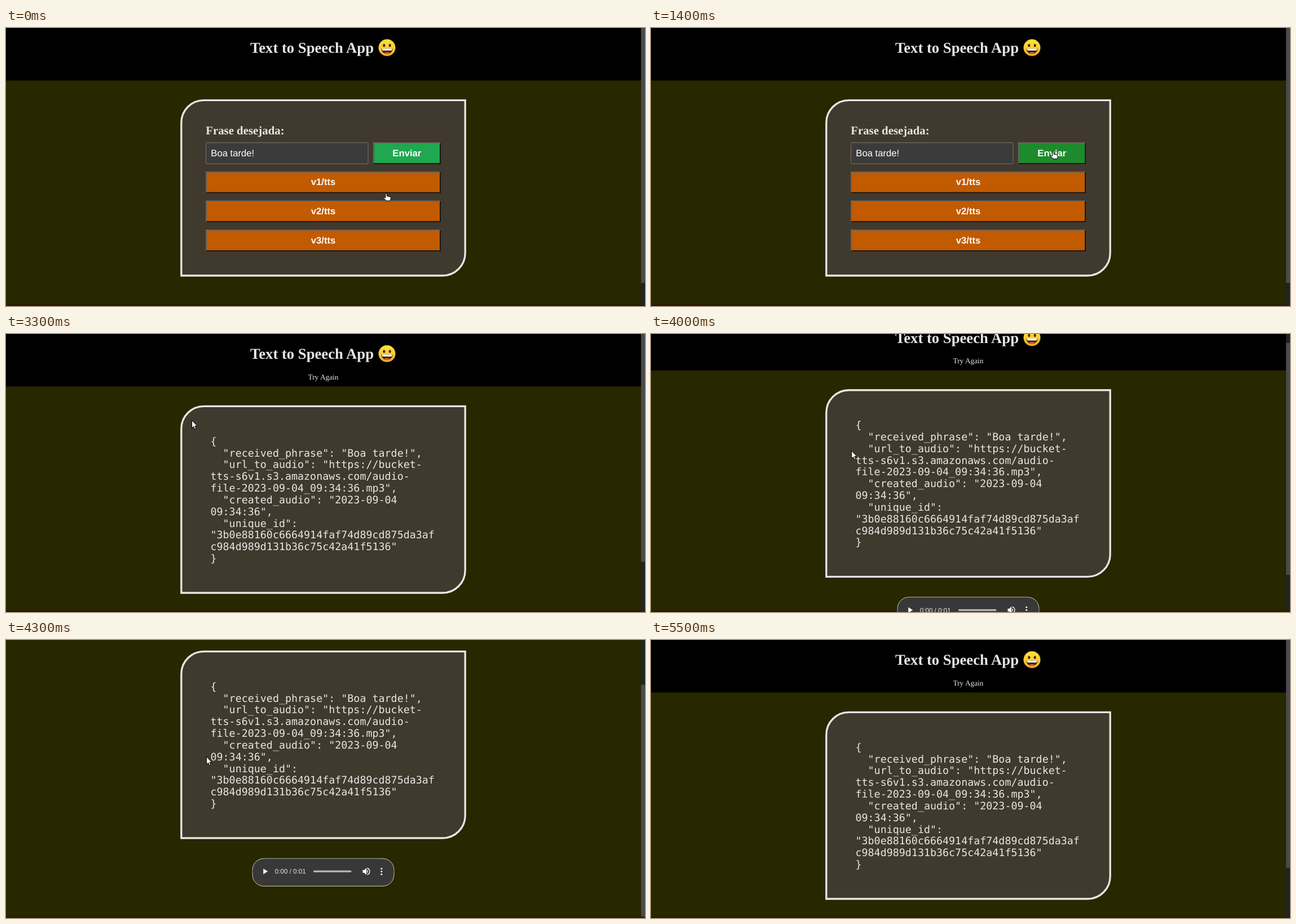
Write an HTML page that moves like this. It is 1133 by 494 pixels and loops after 5900 ms.

```html
<!DOCTYPE html>
<html lang="pt">
<head>
<meta charset="utf-8">
<title>Text to Speech App</title>
<style>
  html, body { margin: 0; width: 100%; height: 100%; overflow: hidden; background: #272700; }
  #stage { position: relative; width: 1133px; height: 494px; overflow: hidden; background: #272700; }
  #stage div, #stage > svg, #page svg { position: absolute; }
  svg { left: 0; top: 0; overflow: visible; }

  /* The page is laid out 1350px wide and shown at five sixths. */
  #page { left: 0; top: 0; width: 1350px; transform-origin: 0 0; text-rendering: geometricPrecision; }
  #header { left: 0; top: 0; width: 1351px; height: 112px; background: #000; }
  .card {
    left: 371px; top: 152px; width: 608px; height: 378px; box-sizing: border-box;
    border: 4px solid #e8e6e3; border-radius: 50px 0; background: #40392e;
  }
  #answer .card { height: 402px; }
  text { fill: #e8e6e3; }
  .serif { font-family: "Liberation Serif", "Times New Roman", serif; }
  .bold { font-weight: bold; }
  .sans, .button { font-family: "Liberation Sans", Arial, sans-serif; }
  .mono { font: 22px "DejaVu Sans Mono", monospace; white-space: pre; }

  #strip { left: 0; top: 491px; width: 1126px; height: 3px; background: #281b09; }
  #track { left: 1126px; top: 0; width: 7px; height: 494px; background: #202324; }
  #thumb { left: 1126px; top: -7px; width: 7px; background: #484b4d; }

  .button {
    --base: #c25a00; --hover: #cc3000; --h: 0;
    left: 425px; width: 500px; height: 46px; box-sizing: border-box;
    display: flex; align-items: center; justify-content: center;
    border: 2px solid; border-color: #6c6a66 #141311 #141311 #6c6a66;
    background: var(--base); background-clip: padding-box; isolation: isolate;
    color: #fff; font-size: 20px; font-weight: bold;
  }
  .button::before {
    content: ""; position: absolute; inset: 0; z-index: -1;
    background: var(--hover); opacity: var(--h);
  }
  .button.pressed { border-color: #141311 #6c6a66 #6c6a66 #141311; }
  #send { --base: #20a74f; --hover: #1e8a2e; left: 781px; top: 244px; width: 144px; }
  #v1 { top: 306px; }
  #v2 { top: 368px; }
  #v3 { top: 430px; }
</style>
</head>
<body>
<div id="stage">
  <div id="strip"></div>
  <div id="page">
    <div id="header"></div>
    <svg width="1350" height="112">
      <defs>
        <linearGradient id="skin" x2="0" y2="1">
          <stop stop-color="#ffe23a"/><stop offset=".55" stop-color="#fdcb2e"/><stop offset="1" stop-color="#f7a021"/>
        </linearGradient>
      </defs>
      <text class="serif bold" x="519.5" y="53" font-size="32">Text to Speech App</text>
      <g transform="translate(810.6 42) scale(1.2)">
        <circle r="15" fill="url(#skin)"/>
        <g fill="#422b0d">
          <ellipse cx="-5.2" cy="-4" rx="2" ry="2.8"/>
          <ellipse cx="5.2" cy="-4" rx="2" ry="2.8"/>
          <path d="M-10 1.5H10C10 7 5.5 11 0 11S-10 7-10 1.5Z"/>
        </g>
        <path d="M-9.3 1.5H9.3Q9 4.5 7.5 5H-7.5Q-9 4.5-9.3 1.5Z" fill="#fff"/>
        <path d="M-5 9.3Q0 6.5 5 9.3Q0 12-5 9.3Z" fill="#e0604f"/>
      </g>
    </svg>

    <div id="ask">
      <div class="card"></div>
      <svg width="1350" height="593">
        <text class="serif bold" x="425" y="227" font-size="25">Frase desejada:</text>
        <rect x="425.5" y="244.5" width="345" height="45" rx="2" fill="#3b3b3b" stroke="#85827d"/>
        <text class="sans" x="436" y="273.5" font-size="20" style="fill:#fff">Boa tarde!</text>
      </svg>
      <div class="button" id="send">Enviar</div>
      <div class="button" id="v1">v1/tts</div>
      <div class="button" id="v2">v2/tts</div>
      <div class="button" id="v3">v3/tts</div>
    </div>

    <div id="answer">
      <div class="card"></div>
      <svg width="1350" height="720">
        <text class="serif" x="675" y="97" font-size="16" text-anchor="middle">Try Again</text>
        <g id="json"></g>
        <g transform="translate(524 595)">
          <rect x=".5" y=".5" width="301" height="59" rx="24" fill="#40392e" stroke="#e8e6e3"/>
          <rect x="1" y="1" width="300" height="54" rx="27" fill="#383838"/>
          <text class="sans" x="48" y="33" font-size="14">0:00 / 0:01</text>
          <rect x="130" y="26" width="81" height="4" rx="2" fill="#b8b8b8"/>
          <g fill="#fff">
            <path d="M23.5 22V34L33 28Z"/>
            <path d="M235 25H238.5L243 20.5V35.5L238.5 31H235Z"/>
            <path d="M244.5 24.2Q248.5 28 244.5 31.8Z"/>
            <circle cx="275" cy="22" r="1.8"/>
            <circle cx="275" cy="28" r="1.8"/>
            <circle cx="275" cy="34" r="1.8"/>
          </g>
          <path d="M244.5 21.2A7 7 0 0 1 244.5 34.8" fill="none" stroke="#fff" stroke-width="1.6"/>
        </g>
      </svg>
    </div>
  </div>

  <div id="track"></div>
  <div id="thumb"></div>

  <svg width="1133" height="494" fill="#fff" stroke="#000">
    <path id="hand" d="M5 .5Q6.2 .5 6.2 1.8V5.2L11 6.1Q13.6 6.7 13.4 9L12.4 13.5H5L1 9Q.3 7.7 1.6 7.2L3.8 8.5V1.8Q3.8 .5 5 .5Z"/>
    <path id="arrow" d="M.5 .5V14L3.6 11.2L5.8 16.2L8 15.2L5.9 10.4H10Z"/>
  </svg>
</div>

<script>
const LOOP = 5900, STEP = 100, RESULT = 2700, SCROLL = 108;
const $ = id => document.getElementById(id);

const json = `{
  "received_phrase": "Boa tarde!",
  "url_to_audio": "https://bucket-
tts-s6v1.s3.amazonaws.com/audio-
file-2023-09-04_09:34:36.mp3",
  "created_audio": "2023-09-04
09:34:36",
  "unique_id":
"3b0e88160c6664914faf74d89cd875da3af
c984d989d131b36c75c42a41f5136"
}`;
json.split("\n").forEach((line, i) => {
  const text = document.createElementNS("http://www.w3.org/2000/svg", "text");
  text.setAttribute("class", "mono");
  text.setAttribute("x", 435);
  text.setAttribute("y", 236 + 25 * i);
  text.textContent = line;
  $("json").append(text);
});

const ramp = (t, from, to) => Math.min(1, Math.max(0, (t - from) / (to - from)));
const smooth = u => u * u * (3 - 2 * u);

// Follows eased moves, each { from, to, x, y }, beginning at a point.
function follow(t, [x, y], moves) {
  for (const move of moves) {
    const k = smooth(ramp(t, move.from, move.to));
    x += (move.x - x) * k;
    y += (move.y - y) * k;
  }
  return `translate(${x} ${y})`;
}

const handMoves = [
  { from: 0, to: 600, x: 669, y: 320 },
  { from: 700, to: 1400, x: 708, y: 219 },
  { from: 2300, to: 2400, x: 705, y: 218.5 }
];
const arrowMoves = [
  { from: 2600, to: 3200, x: 329, y: 153 },
  { from: 3300, to: 4000, x: 355, y: 207 },
  { from: 5000, to: 5400, x: 55, y: 0 }
];

const show = (id, on) => { $(id).style.display = on ? "" : "none"; };
const hover = (id, amount) => $(id).style.setProperty("--h", amount);

function draw(now) {
  const t = Math.floor(now % LOOP / STEP) * STEP;
  const result = t >= RESULT;
  show("ask", !result);
  show("answer", result);
  show("hand", !result);
  show("arrow", result && t < 5500);
  $("hand").setAttribute("transform", follow(t, [669, 293.5], handMoves));
  $("arrow").setAttribute("transform", follow(t, [709, 220], arrowMoves));

  hover("v2", ramp(t, 100, 500) - ramp(t, 800, 1100));
  hover("v1", ramp(t, 800, 1000) - ramp(t, 1000, 1200));
  hover("send", ramp(t, 1100, 1400));
  $("send").classList.toggle("pressed", t >= 1900 && t < 2100);

  const down = ramp(t, 3800, 4300) ** 1.45;
  const back = (1 - ramp(t, 4500, 4800)) ** 2.75;
  const scroll = SCROLL * down * back;
  $("page").style.transform = `translateY(${-scroll}px) scale(${5 / 6})`;
  $("thumb").style.height = (result ? 412 : 460) + "px";
  $("thumb").style.transform = `translateY(${scroll * .8}px)`;
  requestAnimationFrame(draw);
}
draw(0);
</script>
</body>
</html>
```
